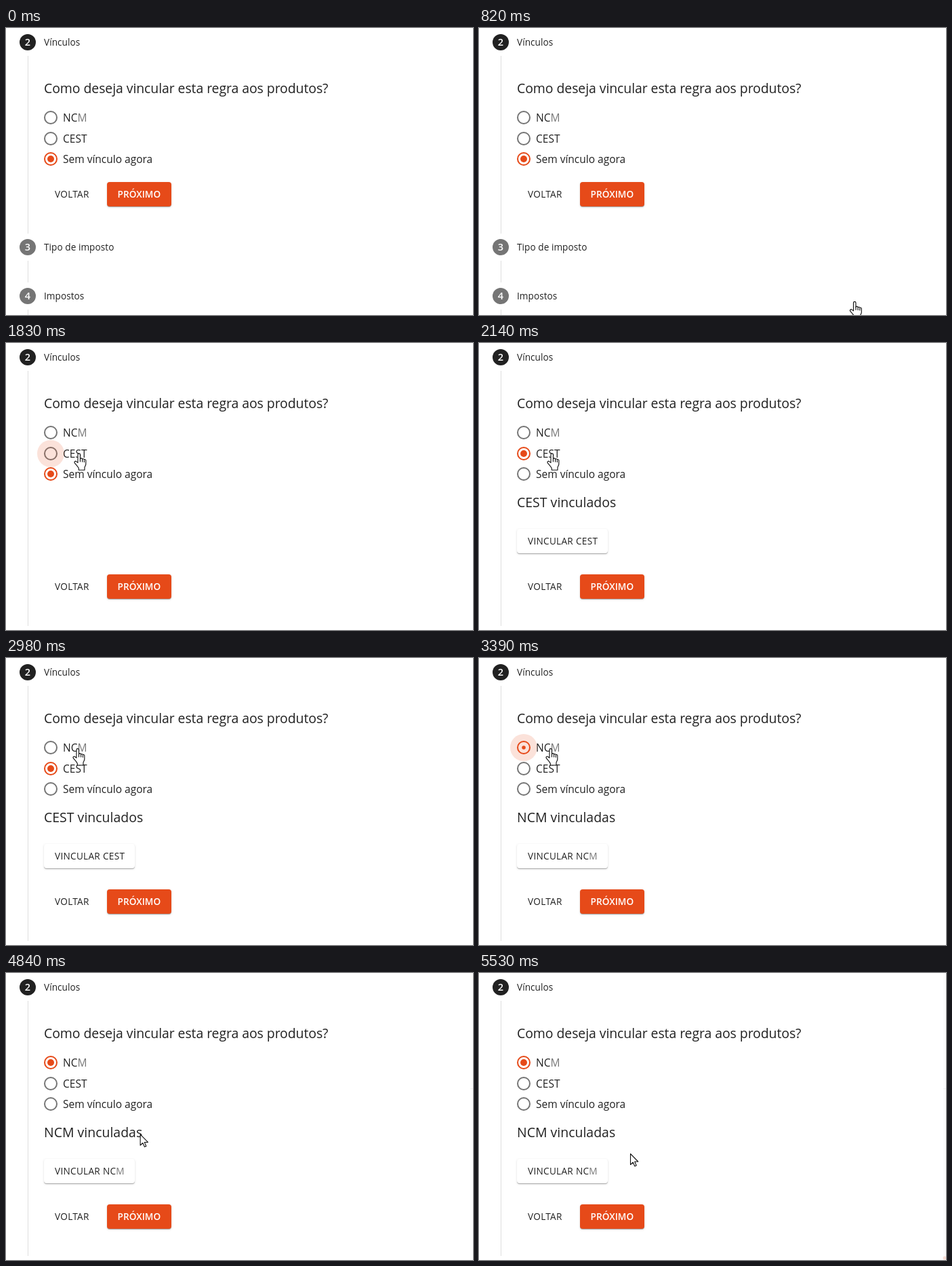
Recreate the animation shown at these times as an HTML page. Size 689 by 423 pixels, loop 5.68 s.

```html
<!DOCTYPE html>
<html lang="pt-BR">
<head>
<meta charset="utf-8">
<title>Vínculos</title>
<style>
html, body { margin: 0; width: 100%; height: 100%; overflow: hidden; background: #fff; }
svg { display: block; width: 689px; height: 423px; font-family: "Open Sans", "Noto Sans", sans-serif; fill: #212121; }
.title { font-size: 19.4px; letter-spacing: -.05px; }
.subtitle { font-size: 19.4px; letter-spacing: .04px; }
.option { font-size: 15.5px; letter-spacing: 0; }
.label { font-size: 13.6px; letter-spacing: .05px; }
.action { font-size: 13.6px; letter-spacing: .3px; }
.primary { font-weight: 600; fill: #fff; letter-spacing: .05px; }
.num { font-size: 14.5px; font-weight: 600; fill: #fff; text-anchor: middle; }
.pale { fill: #777; }
.rail { stroke: #dedede; }
.raised { filter: drop-shadow(0 1px .7px rgba(0,0,0,.26)) drop-shadow(0 1px 1.5px rgba(0,0,0,.14)); }
.cursor { fill: #fff; stroke: #111; stroke-width: 1.1; stroke-linejoin: round; stroke-linecap: round; }
#press { fill: #f8f04a; mix-blend-mode: multiply; }
#ripple { fill: #e64a19; }
</style>
</head>
<body>
<svg viewBox="0 0 689 423">
  <rect width="689" height="423" fill="#fff"/>
  <g id="edge">
    <rect x="685" width="4" height="423" fill="#fbfbfb"/>
    <rect x="685" y="170" width="4" height="1" fill="#f0f0f0"/>
    <circle id="spot" cx="687" cy="420" r="2.5" fill="#f8ddd4"/>
  </g>

  <circle cx="32" cy="21" r="12"/>
  <text class="num" x="32" y="26">2</text>
  <text class="label" x="56" y="26">Vínculos</text>
  <path id="rail" class="rail"/>

  <text class="title" x="56" y="96">Como deseja vincular esta regra aos produtos?</text>
  <g id="radios"></g>
  <text class="option" x="84" y="138">NC<tspan class="pale">M</tspan></text>
  <text class="option" x="84" y="169">CEST</text>
  <text class="option" x="84" y="199">Sem vínculo agora</text>

  <g id="links">
    <rect class="raised" x="56" y="274" width="134" height="36" rx="4" fill="#fff"/>
    <g id="cest">
      <text class="subtitle" x="56" y="242">CEST vinculados</text>
      <text class="action" x="72" y="297">VINCULAR CEST</text>
    </g>
    <g id="ncm">
      <text class="subtitle" x="56" y="242">NCM vinculadas</text>
      <text class="action" x="72" y="297">VINCULAR NC<tspan class="pale">M</tspan></text>
    </g>
  </g>

  <g id="actions">
    <text class="action" x="72" y="250">VOLTAR</text>
    <rect class="raised" x="149" y="227" width="95" height="36" rx="4" fill="#e64a19"/>
    <text class="action primary" x="164.5" y="250">PRÓXIMO</text>
  </g>

  <g id="later">
    <circle cx="32" cy="323" r="12" fill="#757575"/>
    <text class="num" x="32" y="328">3</text>
    <text class="label" x="56" y="328">Tipo de imposto</text>
    <circle cx="32" cy="395" r="12" fill="#757575"/>
    <text class="num" x="32" y="400">4</text>
    <text class="label" x="56" y="400">Impostos</text>
  </g>

  <circle id="ripple" cx="66"/>
  <circle id="press" r="12"/>
  <g id="hand" class="cursor">
    <path d="M5.5 13.5V2a1.7 1.7 0 0 1 3.4 0V8a1.6 1.6 0 0 1 3 .5a1.6 1.6 0 0 1 2.7 .6a1.5 1.5 0 0 1 2.4 1V15.5c0 2-1.5 3-1.8 5V24H6.8V21.5C5.5 19 3 16.5 1 14a1.6 1.6 0 0 1 2.3-2.2z"/>
    <path fill="none" d="M8.9 8v4M11.9 9v3.2M14.6 10v2.5"/>
  </g>
  <path id="arrow" class="cursor" d="M.5 .5V16.5L4.2 13L6.8 18.8L9.2 17.7L6.7 12H11.8z"/>
</svg>
<script>
const LOOP = 5680, START = 812, STEP = 77.14;
const ORANGE = '#e64a19', GREY = '#757575';
const $ = id => document.getElementById(id);
const set = (el, attrs) => { for (const k in attrs) el.setAttribute(k, attrs[k]); };
const show = (id, on) => set($(id), { display: on ? 'inline' : 'none' });
const ramp = (v, a, b) => Math.min(1, Math.max(0, (v - a) / (b - a)));
const mix = (a, b, p) => a.map((v, i) => v + (b[i] - v) * p);
const easeOut = (u, power) => 1 - (1 - u) ** power;

const ROWS = [132, 163, 193];
const ENTRY = [546.8, 403], ON_CEST = [100.3, 162.5], ON_NCM = [98.3, 133.3], REST = [223, 266];
// steps at which each click is pressed and let go
const clicks = [
  { press: 9, release: 12, row: 1, at: [107, 165] },
  { press: 30, release: 32, row: 0, at: [105, 136] }
];

const radios = ROWS.map(cy => ['ring', 'dot'].map(() => {
  const c = document.createElementNS('http://www.w3.org/2000/svg', 'circle');
  set(c, { cx: 66, cy });
  return $('radios').appendChild(c);
}));

function drawRadios(k) {
  const grow = n => easeOut(ramp(k, n, n + 3), 2);
  const shrink = n => 1 - ramp(k, n - 1, n + 1);
  const checked = k < 14 ? 2 : k < 32 ? 1 : 0;
  const scale = [grow(32), k < 31 ? grow(14) : shrink(32), shrink(14)];
  radios.forEach(([ring, dot], i) => {
    const color = i === checked ? ORANGE : GREY;
    set(ring, { r: 9, fill: 'none', stroke: color, 'stroke-width': 2 });
    set(dot, { r: 5 * scale[i], fill: color });
  });
}

function drawClick(k) {
  const c = clicks[k < 24 ? 0 : 1];
  const age = k - c.release;
  show('press', k >= c.press && k < c.release);
  set($('press'), { cx: c.at[0], cy: c.at[1] });
  show('ripple', age >= 0 && age < 3);
  set($('ripple'), {
    cy: ROWS[c.row],
    r: age < 1 ? 14 : 20,
    opacity: age < 2 ? .16 : .08
  });
}

function drawCursor(k) {
  let hand = mix(ENTRY, ON_CEST, easeOut(ramp(k, 0, 8), 1.5));
  if (k > 23) hand = mix(ON_CEST, ON_NCM, easeOut(ramp(k, 23, 28), 1.6));
  const tip = mix([105.5, 134], REST, easeOut(ramp(k, 46, 61), 3));
  const leaving = k > 46;
  show('hand', k >= 0 && !leaving);
  show('arrow', leaving);
  set($('hand'), { transform: `translate(${hand}) scale(1.03)` });
  set($('arrow'), { transform: `translate(${tip})` });
}

function draw(t) {
  const k = Math.floor((t - START) / STEP);
  const open = k >= 12;
  set($('rail'), { d: open ? 'M32.5 41V417' : 'M32.5 41V303M32.5 343V375M32.5 415V423' });
  set($('actions'), { transform: `translate(0 ${open ? 114 : 0})` });
  show('later', !open);
  show('links', k >= 14);
  show('cest', k < 32);
  show('ncm', k >= 32);
  show('edge', k >= 43);
  show('spot', k >= 55);
  drawRadios(k);
  drawClick(k);
  drawCursor(k);
}

function tick() {
  draw(performance.now() % LOOP);
  requestAnimationFrame(tick);
}
tick();
</script>
</body>
</html>
```
